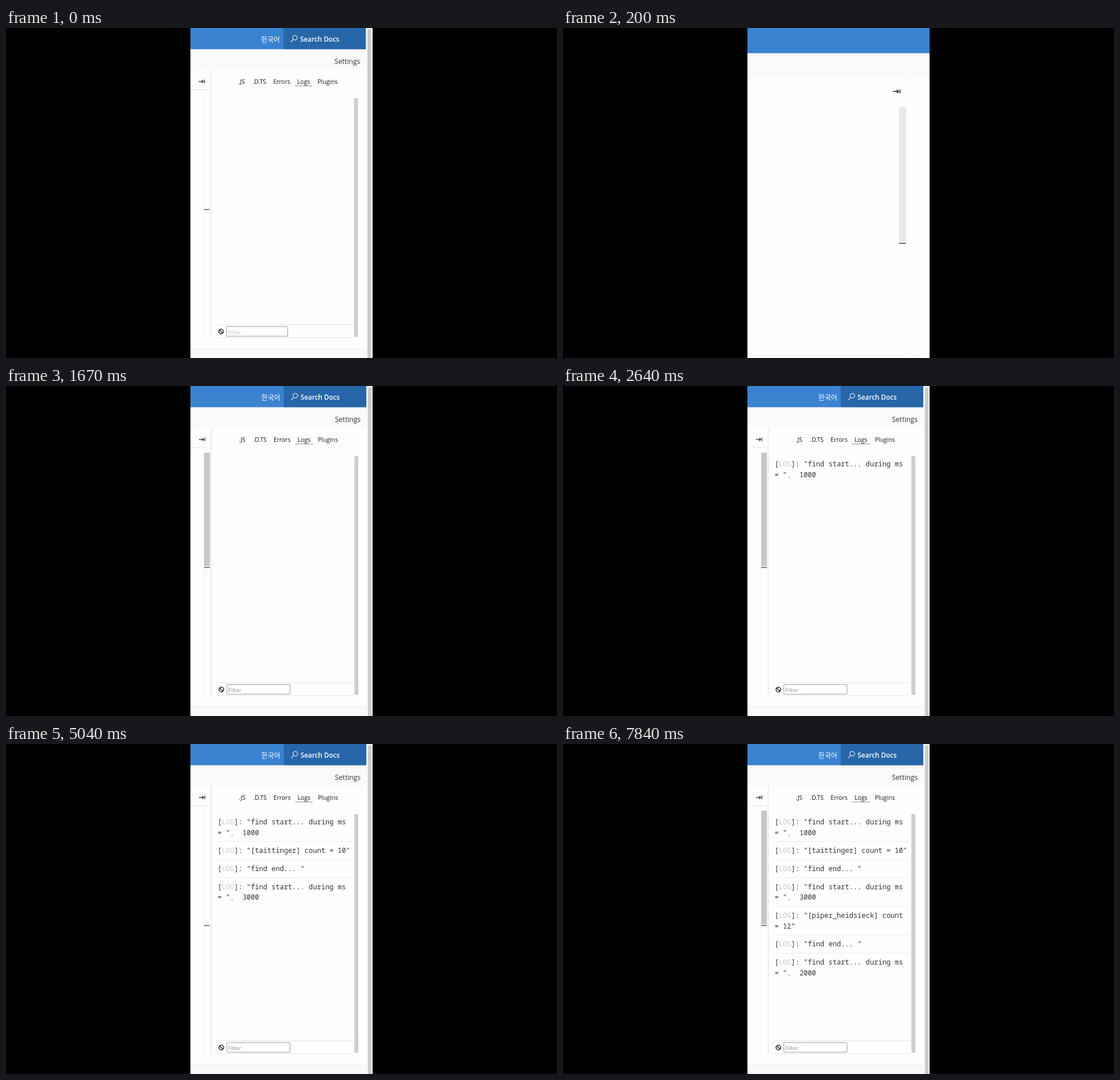
An HTML page that plays this animation: 968x579 px, repeating every 8000 ms.

```html
<!DOCTYPE html>
<html lang="ko">
<head>
<meta charset="utf-8">
<title>Logs panel</title>
<style>
html, body { margin: 0; width: 100%; height: 100%; overflow: hidden; background: #000; }
svg { display: block; width: 100%; height: 100%; }
text { white-space: pre; }
.ui { font-family: "Open Sans", "Noto Sans", sans-serif; }
.ko { font: 500 12px "Noto Sans CJK KR", "Noto Sans CJK JP", sans-serif; }
.tab { font-size: 10.5px; font-weight: 500; fill: #151515; text-anchor: middle; }
.log { font: 12.13px "Noto Sans Mono", "DejaVu Sans Mono", monospace; fill: #333; }
.pale { fill: #c9c9c9; }
.comma { fill: #999; }
</style>
</head>
<body>
<svg viewBox="0 0 968 579">
  <defs><clipPath id="screen"><rect x="324" width="320" height="579"/></clipPath></defs>
  <rect width="968" height="579"/>
  <g clip-path="url(#screen)">
    <rect x="324" width="320" height="579" fill="#fefefe"/>
    <g id="page">
      <!-- header -->
      <rect y="-2" width="633" height="39.5" fill="#3a83d0"/>
      <rect x="488" y="-2" width="145" height="39.5" fill="#2766a8"/>
      <text class="ko" x="448.6" y="24.6" fill="#fff">한국어</text>
      <g fill="none" stroke="#fff" stroke-width="1.1">
        <circle cx="508.3" cy="17" r="4"/>
        <path d="M505.4 20L501 24.8"/>
      </g>
      <text class="ui" x="517.5" y="24.2" fill="#fff" font-size="11.8" font-weight="600">Search Docs</text>
      <rect y="37.5" width="633" height="36.5" fill="#fafaf8"/>
      <text class="ui" x="577.8" y="62.9" fill="#333" font-size="12.2" font-weight="500">Settings</text>

      <!-- editor edge -->
      <path d="M339 93.8H347M344.6 91.4L347.4 93.8L344.6 96.2M349.4 90.6V97" fill="none" stroke="#222" stroke-width="1.2"/>
      <g id="rules" fill="#e2e2e2">
        <rect x="300" y="108" width="60" height="1"/>
        <rect x="348" y="117" width="1" height="427" fill="#ededed"/>
      </g>
      <rect id="border" x="360" y="74" width="1" height="470" fill="#dcdcdc"/>
      <rect id="thumb" x="348" y="117" width="10.3" height="199" fill="#c8c8c8"/>
      <rect x="348" y="317.7" width="10.3" height="1.5" fill="#555"/>

      <!-- side panel -->
      <g id="tabs" class="ui"></g>
      <rect x="508" y="101.2" width="31" height="1" fill="#8a8a8a"/>
      <g id="logs"></g>
      <rect x="612" y="123" width="7" height="419" rx="1" fill="#cecece"/>
      <rect x="372" y="520" width="238" height="1" fill="#e4e4e4"/>
      <rect x="372" y="543" width="238" height="1" fill="#e4e4e4"/>
      <g fill="none" stroke="#2a2a2a" stroke-width="1.6">
        <circle cx="378.4" cy="532.6" r="4.1"/>
        <path d="M375.5 529.7L381.3 535.5"/>
      </g>
      <rect id="input" x="388" y="523.8" width="111" height="17" rx="1" fill="#fff" stroke="#989898"/>
      <text id="hint" class="ui" x="390.6" y="536.5" fill="#8c8c8c" font-size="9.8">Filter</text>

      <!-- page frame -->
      <rect x="0" y="562" width="633" height="1" fill="#ececec"/>
      <rect x="0" y="563" width="633" height="20" fill="#f9f9f9"/>
      <rect x="633" y="-2" width="11" height="585" fill="#f6f6f6"/>
      <rect x="635.8" y="2" width="6.4" height="590" rx="3" fill="#cbcbcb"/>
    </g>
  </g>
</svg>
<script>
const LOOP = 8000;
const $ = id => document.getElementById(id);

const tabs = [[".JS", 414.8], [".D.TS", 446], ["Errors", 485], ["Logs", 523.6], ["Plugins", 565.6]];
$("tabs").innerHTML = tabs.map(([name, x]) => `<text class="tab" x="${x}" y="97.7">${name}</text>`).join("");

// [appears at, first baseline, divider above, first line, second line]
const entries = [
  [2640, 140.8, 0, '"find start... during ms', '= ",  1000'],
  [3640, 191.2, 170.5, '"[taittinger] count = 10"'],
  [3640, 222.9, 202.3, '"find end... "'],
  [3640, 254.7, 234, '"find start... during ms', '= ",  3000'],
  [6640, 305, 284.5, '"[piper_heidsieck] count', '= 12"'],
  [6640, 355.4, 334.8, '"find end... "'],
  [6640, 387.2, 366.5, '"find start... during ms', '= ",  2000']
];
const line = (y, s) => `<text class="log" x="371.8" y="${y}">${s}</text>`;
$("logs").innerHTML = entries.map(([, y, rule, a, b]) => "<g>" +
  (rule ? `<rect x="372" y="${rule}" width="236" height="1" fill="#ececec"/>` : "") +
  line(y, `[<tspan class="pale">LOG</tspan>]: ${a}`) +
  (b ? line(y + 18.7, b.replace(",", '<tspan class="comma">,</tspan>')) : "") + "</g>").join("");
const logs = [...$("logs").children];

const pan = [[0, 0], [30, 0], [30, 1.1], [130, 1], [680, 0]];
const thumb = [[0, 0], [30, 0], [30, .35], [130, .35], [770, .9], [1300, 1], [2640, 1], [2970, 0], [7630, 0], [7840, 1]];
const rules = [[0, 1], [30, 1], [30, 0], [970, 0], [1400, 1]];
const border = [[0, 1], [30, 1], [30, .2], [770, .35], [1400, 1]];

const linear = k => k;
const smooth = k => k * k * (3 - 2 * k);

function at(keys, t, ease = linear) {
  let i = keys.length - 1;
  while (i > 0 && keys[i][0] > t) i--;
  const a = keys[i], b = keys[i + 1];
  return b ? a[1] + (b[1] - a[1]) * ease((t - a[0]) / (b[0] - a[0])) : a[1];
}

function draw(t) {
  const p = at(pan, t, smooth), early = t < 30;
  const x = early ? -.7 : 186 * p;
  $("page").setAttribute("transform", `translate(${x} 0) scale(${1 + .195 * p})`);
  $("thumb").setAttribute("opacity", at(thumb, t));
  $("rules").setAttribute("opacity", at(rules, t));
  $("border").setAttribute("opacity", at(border, t));
  $("input").setAttribute("width", early ? 107.5 : 111);
  $("hint").setAttribute("opacity", early ? .6 : 1);
  logs.forEach((g, i) => g.setAttribute("visibility", t >= entries[i][0] ? "visible" : "hidden"));
}

const start = performance.now();
function tick() {
  draw((performance.now() - start) % LOOP);
  requestAnimationFrame(tick);
}
tick();
</script>
</body>
</html>
```
